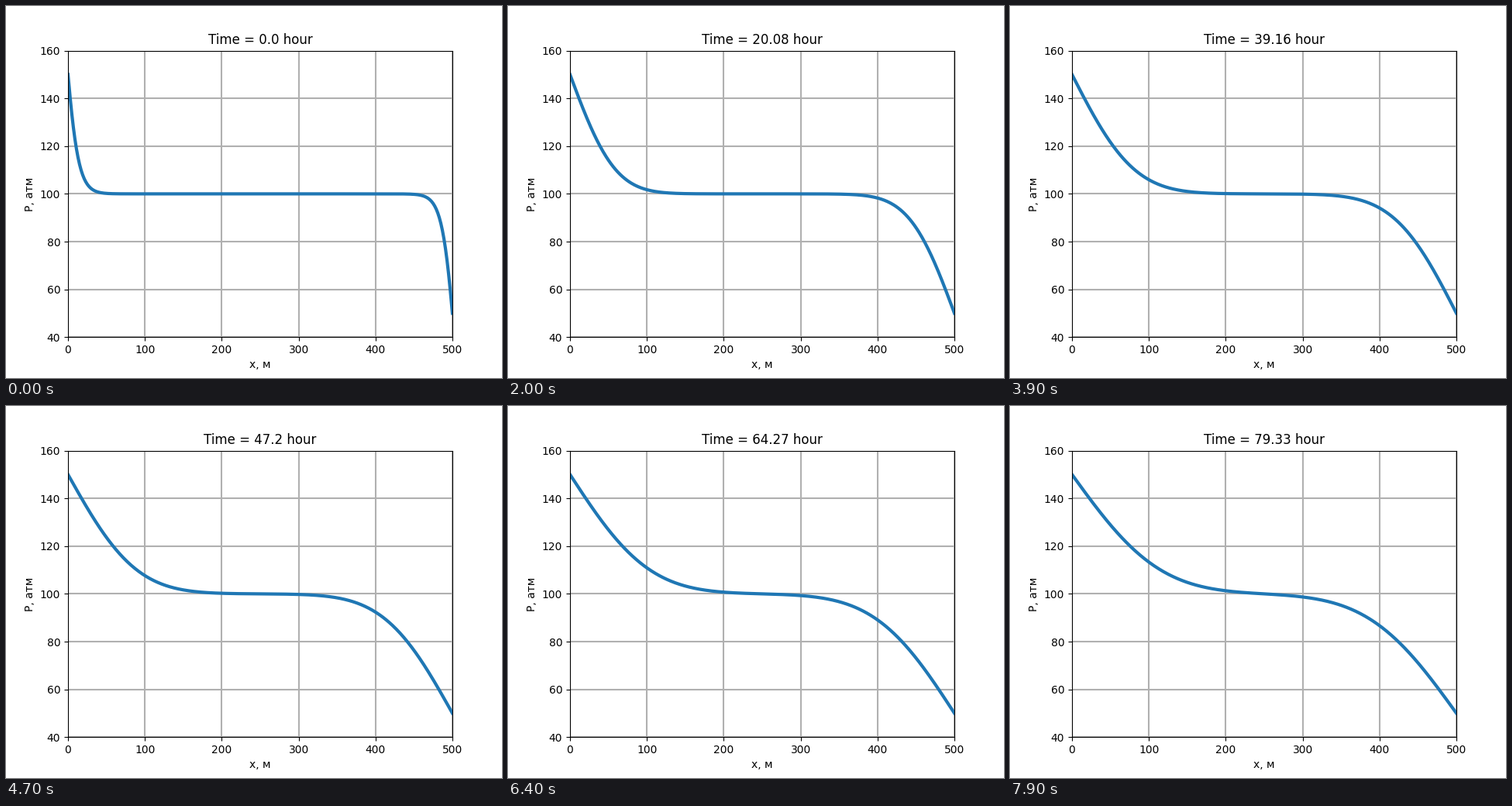
Write a matplotlib script that moves like this. It is 640 px wide and 480 px high and loops after 8000 ms.

```python
import numpy as np
import matplotlib.pyplot as plt
from matplotlib.animation import FuncAnimation

FRAMES = 80
INTERVAL = 100            # ms
LENGTH = 500.0            # m
P_LEFT, P_START, P_RIGHT = 150.0, 100.0, 50.0   # atm
SPREAD = 50.2             # diffusivity times time step, m^2
HOURS = np.linspace(0, 240, 240)

x = np.linspace(0, LENGTH, 501)


def implicit_step_matrix(n, r):
    """Inverse of the backward Euler matrix with fixed end pressures."""
    a = np.diag(np.full(n, 1 + 2 * r))
    a += np.diag(np.full(n - 1, -r), 1) + np.diag(np.full(n - 1, -r), -1)
    for end in (0, -1):
        a[end] = 0
        a[end, end] = 1
    return np.linalg.inv(a)


def solve():
    step = implicit_step_matrix(x.size, SPREAD / (x[1] - x[0]) ** 2)
    p = np.full(x.size, P_START)
    p[0], p[-1] = P_LEFT, P_RIGHT
    p = step @ p
    rows = []
    for _ in range(FRAMES):
        p = step @ p
        rows.append(p)
    return rows


pressure = solve()

plt.rcParams["font.family"] = "DejaVu Sans"
fig, ax = plt.subplots(figsize=(6.4, 4.8), dpi=100)
line, = ax.plot(x, pressure[0], color="#1f77b4", lw=3)
ax.set_xlim(0, LENGTH)
ax.set_ylim(40, 160)
ax.set_xlabel("x, м")
ax.set_ylabel("P, атм")
ax.grid(color="#b0b0b0", lw=1.5)
title = ax.set_title("")


def update(i):
    line.set_ydata(pressure[i])
    title.set_text(f"Time = {round(float(HOURS[i]), 2)} hour")
    return line, title


anim = FuncAnimation(fig, update, frames=FRAMES, interval=INTERVAL,
                     repeat=True, repeat_delay=0, blit=False)
plt.show()
```
